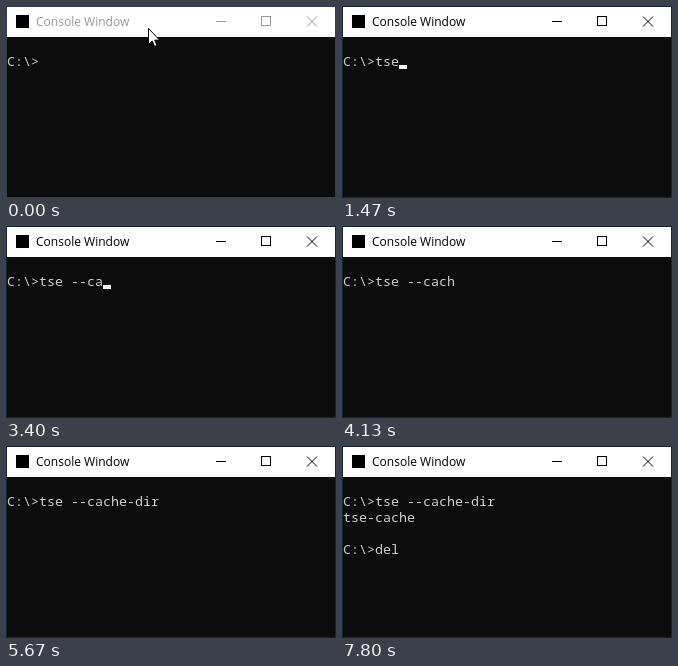
An HTML page that plays this animation: 330 by 192 pixels, repeating every 8 s.

```html
<!DOCTYPE html>
<html lang="en">
<head>
<meta charset="utf-8">
<title>Console</title>
<style>
html, body { margin: 0; width: 100%; height: 100%; overflow: hidden; background: #0c0c0c; }
svg { display: block; width: 330px; height: 192px; }
text { white-space: pre; }
#title { font: 12px "Open Sans", "Noto Sans", sans-serif; }
.row { font: 13.333px "Noto Sans Mono", "DejaVu Sans Mono", monospace; fill: #ccc; }
</style>
</head>
<body>
<svg viewBox="0 0 330 192">
  <rect width="330" height="192" fill="#0c0c0c"/>
  <rect y="1" width="330" height="30" fill="#fff"/>
  <rect x="10" y="9" width="13" height="13" fill="#000"/>
  <text id="title" x="30" y="20"></text>
  <g id="buttons" fill="none">
    <path d="M210 15.5h10M255.5 10.5h9v9h-9z" shape-rendering="crispEdges"/>
    <path d="M301 10.5l10 10M311 10.5l-10 10"/>
  </g>
  <text class="row" x="1" y="60"></text>
  <text class="row" x="1" y="76"></text>
  <text class="row" x="1" y="108"></text>
  <rect id="caret" width="8" height="4" fill="#f2f2f2"/>
  <rect id="frame" x=".5" y=".5" width="329" height="191" fill="none"/>
  <path id="pointer" d="M.5 .5V16.5L4.2 13 6.6 18.5 9 17.5 6.7 12.1H11.6Z" fill="#fff" stroke="#000"/>
</svg>
<script>
const LOOP = 8000, CELL = 8, ROW = 16;
const NAME = 'Console Window', PROMPT = 'C:\\>';
const RUN = 6000, OUTPUT = 6070, DONE = 6130;

const first = {
  text: 'tse --cache-dir',
  keys: [930, 1200, 1470, 1870, 2330, 2800, 3130, 3400, 3730, 4000, 4400, 4730, 5070, 5330, 5670]
};
const second = { text: 'del ', keys: [6730, 7130, 7400, 7600] };
// Moments at which the caret blinks off; any later key shows it again.
const blinks = [0, 2000, 2530, 3070, 3600, 4130, 4670, 5200, 5670, 7270, 7800];
const shows = [...first.keys, RUN, OUTPUT, DONE, ...second.keys];
const moves = [[0, 142, 22], [530, 154, 17], [600, 152, 20], [670, 150, 24]];

const $ = id => document.getElementById(id);
const rows = document.querySelectorAll('.row');
const set = (el, attrs) => {
  for (const key in attrs) el.setAttribute(key, attrs[key]);
};
const say = (el, text) => {
  if (el.textContent !== text) el.textContent = text;
};
const latest = (times, t) => times.filter(x => x <= t).pop() ?? -1;
const typed = (cmd, t) => PROMPT + cmd.text.slice(0, cmd.keys.filter(k => k <= t).length);

function draw(t) {
  const active = t >= 70;
  const running = t >= RUN && t < DONE;
  const lines = [
    typed(first, t),
    t >= OUTPUT ? 'tse-cache' : '',
    t >= DONE ? typed(second, t) : ''
  ];
  lines.forEach((line, i) => say(rows[i], line));

  say($('title'), NAME + (running ? ' - tse  --c...' : ''));
  set($('title'), { fill: active ? '#000' : '#999' });
  set($('buttons'), { stroke: active ? '#000' : '#999' });
  set($('frame'), { stroke: active ? '#14233f' : '#303c55' });

  const row = t >= DONE ? 3 : t >= OUTPUT ? 2 : t >= RUN ? 1 : 0;
  const column = running ? 0 : lines[row ? 2 : 0].length;
  const lit = latest(shows, t) > latest(blinks, t);
  set($('caret'), { x: 1 + column * CELL, y: 59 + row * ROW, visibility: lit ? 'visible' : 'hidden' });

  const [, x, y] = moves.filter(m => m[0] <= t).pop();
  set($('pointer'), {
    transform: `translate(${x} ${y})`,
    visibility: t < first.keys[0] ? 'visible' : 'hidden'
  });
}

const start = performance.now();
function tick() {
  draw((performance.now() - start) % LOOP);
  requestAnimationFrame(tick);
}
draw(0);
requestAnimationFrame(tick);
</script>
</body>
</html>
```
